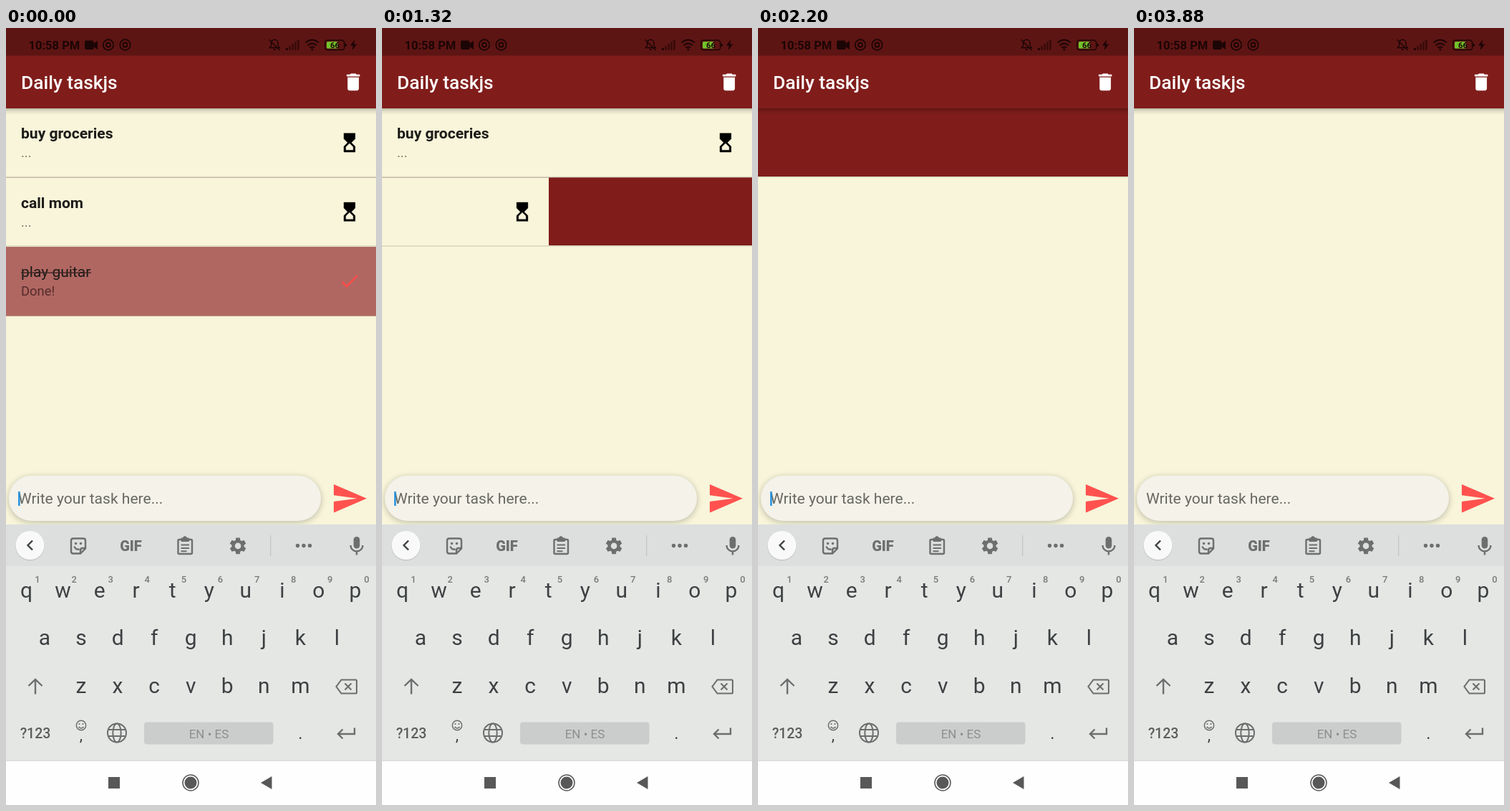
Write an HTML page that moves like this. It is 517 px wide and 1083 px high and loops after 3920 ms.

```html
<!DOCTYPE html>
<html lang="en">
<head>
<meta charset="utf-8">
<title>Daily tasks</title>
<style>
  html, body { margin: 0; width: 100%; height: 100%; overflow: hidden; background: #f8f5da; }
  svg { display: block; width: 517px; height: 1083px; font-family: Roboto, "Noto Sans", sans-serif; }
  .mid { text-anchor: middle; }
  .title { font-size: 21.05px; font-weight: 700; fill: #1c1b18; }
  .sub { font-size: 18.4px; fill: #77766a; }
  .line { fill: none; stroke: #6c6f6e; stroke-width: 2.4; }
  .key { font-size: 30px; fill: #3e4143; }
  .num { font-size: 13px; font-weight: 500; fill: #777a79; }

  /* rows are swiped away, then their red backing folds up */
  .row { transform-origin: 0 0; }
  .row, .tile, #caret { animation: 3920ms linear infinite both; }
  #r1 { animation-name: fold1; }
  #r2 { animation-name: fold2; }
  #r3 { animation-name: fold3; }
  #r1 .tile { animation-name: swipe1; }
  #r2 .tile { animation-name: swipe2; }
  #r3 .tile { animation-name: swipe3; }
  #caret { animation-name: blink; animation-timing-function: step-end; }

  @keyframes swipe3 {
    0%, 17.35% { transform: translateX(0); animation-timing-function: cubic-bezier(.45, 0, .5, 1); }
    24.48%, 25.48% { transform: translateX(512px); }
    25.51%, 100% { transform: translateX(520px); }
  }
  @keyframes fold3 {
    0%, 28.06% { transform: translateY(304.9px) scaleY(1); animation-timing-function: ease; }
    32.65%, 100% { transform: translateY(304.9px) scaleY(0); }
  }
  @keyframes swipe2 {
    0%, 30.36% { transform: translateX(0); animation-timing-function: cubic-bezier(.45, 0, .8, .7); }
    33.66%, 34.67% { transform: translateX(-284px); animation-timing-function: cubic-bezier(.2, .5, .6, 1); }
    37.76%, 100% { transform: translateX(-520px); }
  }
  @keyframes fold2 {
    0%, 41.84% { transform: translateY(208.4px) scaleY(1); animation-timing-function: cubic-bezier(.35, .2, .5, .92); }
    44.89%, 46.91% { transform: translateY(208.4px) scaleY(.094); }
    46.94%, 100% { transform: translateY(208.4px) scaleY(0); }
  }
  @keyframes swipe1 {
    0%, 43.88% { transform: translateX(0); }
    44.89%, 46.91% { transform: translateX(18px); animation-timing-function: cubic-bezier(.3, .2, .5, 1); }
    53.06%, 100% { transform: translateX(520px); }
  }
  @keyframes fold1 {
    0%, 56.5% { transform: translateY(112px) scaleY(1); animation-timing-function: ease; }
    61.22%, 100% { transform: translateY(112px) scaleY(0); }
  }
  @keyframes blink {
    0%, 25%, 50.51%, 76.02% { opacity: 1; }
    12.24%, 37.76%, 63.2%, 88.78%, 100% { opacity: 0; }
  }
</style>
</head>
<body>
<svg viewBox="0 0 517 1083">
  <defs>
    <linearGradient id="shade" x2="0" y2="1">
      <stop offset="0" stop-opacity=".26"/>
      <stop offset=".4" stop-opacity=".09"/>
      <stop offset="1" stop-opacity="0"/>
    </linearGradient>
    <filter id="blur" x="-10%" y="-50%" width="120%" height="200%"><feGaussianBlur stdDeviation="5"/></filter>
    <path id="glass" transform="translate(464.2 32) scale(1.316)" stroke="#000" stroke-width=".3" stroke-linejoin="round"
      d="M6 2l.01 6L10 12l-3.99 4.01L6 22h12v-6l-4-4 4-3.99V2H6zm10 14.5V20H8v-3.5l4-4 4 4z"/>
    <g id="ring" fill="none" stroke="#1c0505">
      <circle r="7.3" stroke-width="1.7"/>
      <circle r="3" stroke-width="1.8"/>
    </g>
  </defs>

  <rect width="517" height="1083" fill="#f8f5da"/>

  <g id="r3" class="row">
    <rect width="517" height="96.3" fill="#801d1b"/>
    <g class="tile">
      <rect width="517" height="96.3" fill="#b06762"/>
      <text x="21" y="42.3" class="title" style="font-weight:400">play guitar</text>
      <rect x="21" y="35.6" width="98" height="1.3" fill="#3a2220"/>
      <text x="21" y="68.3" class="sub" style="fill:#552b29">Done!</text>
      <path transform="translate(464.2 32) scale(1.316)" fill="#fb4d4b" d="M9 16.17L4.83 12l-1.42 1.41L9 19 21 7l-1.41-1.41z"/>
    </g>
  </g>
  <g id="r2" class="row">
    <rect width="517" height="95.2" fill="#801d1b"/>
    <g class="tile">
      <rect width="517" height="95.2" fill="#f8f5da"/>
      <text x="21" y="42.3" class="title">call mom</text>
      <text x="21" y="68.3" class="sub">...</text>
      <use href="#glass"/>
    </g>
    <rect y="95" width="517" height="1.4" fill="#d9d7c1"/>
  </g>
  <g id="r1" class="row">
    <rect width="517" height="95.2" fill="#801d1b"/>
    <g class="tile">
      <rect width="517" height="95.2" fill="#f8f5da"/>
      <text x="21" y="42.3" class="title">buy groceries</text>
      <text x="21" y="68.3" class="sub">...</text>
      <use href="#glass"/>
    </g>
    <rect y="95" width="517" height="1.4" fill="#d9d7c1"/>
  </g>

  <!-- app bar -->
  <rect y="112" width="517" height="9" fill="url(#shade)"/>
  <rect y="38" width="517" height="74" fill="#801d1b"/>
  <text x="21" y="84.5" font-size="26.3" font-weight="500" fill="#fff">Daily taskjs</text>
  <path transform="translate(469.4 59.5) scale(1.316)" fill="#fff" d="M6 19c0 1.1.9 2 2 2h8c1.1 0 2-.9 2-2V7H6v12zM19 4h-3.5l-1-1h-5l-1 1H5v2h14V4z"/>

  <!-- status bar -->
  <rect width="517" height="38.5" fill="#5d1514"/>
  <g fill="#1c0505">
    <text x="31.5" y="29.5" font-size="16.5" font-weight="600">10:58 PM</text>
    <rect x="110" y="17.5" width="12.5" height="12.5" rx="2"/>
    <path d="M122 22l6-4v12l-6-4z"/>
    <use href="#ring" x="143" y="23.5"/>
    <use href="#ring" x="166.5" y="23.5"/>
    <g fill="none" stroke="#1c0505" stroke-width="1.5">
      <path d="M368.5 27.5h13.500l-2-3v-3.500a4.700 4.700 0 0 0-9.400 0v3.500zM373.500 29.800h3.500M367.500 16l15 15"/>
    </g>
    <g fill="#3b0c0b">
      <rect x="395" y="25" width="2.8" height="6"/>
      <rect x="399" y="22" width="2.8" height="9"/>
      <rect x="403" y="19" width="2.8" height="12"/>
      <rect x="407" y="16" width="2.8" height="15"/>
    </g>
    <rect x="391" y="28" width="2.8" height="3"/>
    <g fill="none" stroke="#1c0505" stroke-width="2">
      <path d="M418.500 20.500q9.200-8 18.500 0M421.500 24.200q6.200-5.200 12.500 0M424.500 27.600q3.200-2.600 6.500 0"/>
    </g>
    <circle cx="427.800" cy="30" r="1.600"/>
    <rect x="445.800" y="17" width="27" height="13.500" rx="3.500" fill="none" stroke="#1c0505" stroke-width="1.500"/>
    <rect x="448" y="19" width="15.500" height="9.500" rx="1.500" fill="#73c22b"/>
    <rect x="474" y="21.500" width="1.800" height="4.500" rx=".8"/>
    <text x="459.500" y="28" class="mid" font-size="11.500" font-weight="700">66</text>
    <path d="M487.500 16l-6.500 8.500h4l-1.500 6.500 7-8.500h-4.300z"/>
  </g>

  <!-- input -->
  <rect x="4" y="626" width="436" height="63" rx="31.5" opacity=".24" filter="url(#blur)"/>
  <rect x="4" y="624" width="436" height="63" rx="31.5" fill="#f4f2e9"/>
  <text x="17" y="663" font-size="21.05" fill="#686862">Write your task here...</text>
  <rect id="caret" x="17" y="646" width="2.6" height="20" fill="#2b95e0"/>
  <path transform="translate(453.600 629.400) scale(2.190)" fill="#ff524f" d="M2.010 21L23 12 2.010 3 2 10l15 2-15 2z"/>

  <!-- keyboard -->
  <rect y="692" width="517" height="330" fill="#e5e7e5"/>
  <rect y="692" width="517" height="58" fill="#dcdfdd"/>
  <circle cx="33.500" cy="722" r="20.500" fill="#c7cac8"/>
  <circle cx="33.500" cy="721" r="20" fill="#f8f9f8"/>
  <path d="M37 714.500l-6.500 6.500 6.500 6.500" class="line" style="stroke:#3e4143"/>
  <g class="line">
    <path d="M94 711.500h14q3 0 3 3v11l-7 7H94q-3 0-3-3v-15q0-3 3-3zM111 725h-4q-3 0-3 3v4.500"/>
    <path d="M95.500 722.500q1.500 5 7 4"/>
    <path d="M242 713h16.500q1.500 0 1.500 1.500v17q0 1.500-1.500 1.500H242q-1.500 0-1.500-1.500v-17q0-1.500 1.500-1.500z"/>
    <path d="M244.500 720.500h11.500M244.500 725h11.500M244.500 729.300h8" stroke-width="2"/>
    <path d="M481.500 721a8.500 8.500 0 0 0 17 0M490 729.500v5"/>
    <path d="M31.500 917l9.500-9 9.500 9M41 909v19.500"/>
    <path d="M468.500 908.500h20q1.500 0 1.500 1.500v16q0 1.500-1.500 1.500h-20l-7-9.500zM473.500 913.500l9 9M482.500 913.500l-9 9" stroke-width="2.100"/>
    <path d="M487 975.500v8.500h-22.500M470.500 977.500l-6.500 6.500 6.500 6.500"/>
    <g style="stroke-width:2">
      <circle cx="155" cy="982.500" r="13"/>
      <ellipse cx="155" cy="982.500" rx="5.700" ry="13"/>
      <path d="M143 978h24M143 987h24"/>
    </g>
    <g style="stroke-width:1.500">
      <circle cx="105" cy="972" r="6.700"/>
      <path d="M101.500 974q3.500 4 7 0"/>
    </g>
  </g>
  <g fill="#6c6f6e">
    <circle cx="97.500" cy="718.500" r="1.700"/>
    <circle cx="104.500" cy="718.500" r="1.700"/>
    <rect x="244.500" y="710.500" width="11.500" height="5.500" rx="1"/>
    <circle cx="250" cy="711" r="2.700"/>
    <text x="174.500" y="728.500" class="mid" font-size="20" font-weight="900">GIF</text>
    <path transform="translate(309.800 707.600) scale(1.190)" d="M19.140 12.940c.04-.3.06-.61.06-.94 0-.32-.02-.64-.07-.94l2.030-1.580c.18-.14.23-.41.12-.61l-1.920-3.320c-.12-.22-.37-.29-.59-.22l-2.390.96c-.5-.38-1.030-.7-1.620-.94l-.36-2.540c-.04-.24-.24-.41-.48-.41h-3.840c-.24 0-.43.17-.47.41l-.36 2.540c-.59.24-1.130.57-1.620.94l-2.390-.96c-.22-.08-.47 0-.59.22L2.740 8.870c-.12.21-.08.47.12.61l2.030 1.580c-.05.3-.09.63-.09.94s.02.64.07.94l-2.030 1.580c-.18.14-.23.41-.12.61l1.920 3.320c.12.22.37.29.59.22l2.390-.96c.5.38 1.030.7 1.620.94l.36 2.540c.05.24.24.41.48.41h3.840c.24 0 .44-.17.47-.41l.36-2.540c.59-.24 1.130-.56 1.620-.94l2.390.96c.22.08.47 0 .59-.22l1.920-3.320c.12-.22.07-.47-.12-.61zM12 15.600a3.600 3.600 0 1 1 0-7.200 3.600 3.600 0 0 1 0 7.200z"/>
    <circle cx="407.500" cy="721.500" r="2.700"/>
    <circle cx="416" cy="721.500" r="2.700"/>
    <circle cx="424.500" cy="721.500" r="2.700"/>
    <rect x="485.700" y="709" width="8.600" height="16.500" rx="4.300"/>
    <circle cx="102.500" cy="970" r="1.100"/>
    <circle cx="107.500" cy="970" r="1.100"/>
  </g>
  <rect x="369" y="707" width="1.300" height="29" fill="#c5c8c6"/>
  <g id="keys"></g>
  <text x="41" y="990" class="mid" font-size="19.500" font-weight="500" fill="#5b5e5d">?123</text>
  <text x="105" y="993" class="mid" font-size="22" fill="#3e4143">,</text>
  <text x="411.500" y="991" class="mid" font-size="24" fill="#3e4143">.</text>
  <rect x="193" y="967.500" width="180.500" height="31" rx="4" fill="#cbcdcc"/>
  <text x="283.500" y="989.500" class="mid" font-size="17" fill="#8d8f8e">EN • ES</text>

  <!-- navigation -->
  <rect y="1021" width="517" height="62" fill="#fdfefd"/>
  <rect y="1020.500" width="517" height="1.200" fill="#d4d6d4"/>
  <g fill="#585858">
    <rect x="143" y="1044" width="16" height="16"/>
    <circle cx="258" cy="1052" r="8.500"/>
    <circle cx="258" cy="1052" r="11" fill="none" stroke="#585858" stroke-width="1.500"/>
    <path d="M356 1052l15.500-9v18z"/>
  </g>
</svg>
<script>
  const keys = document.getElementById('keys');

  function label(x, y, cls, str) {
    const el = document.createElementNS('http://www.w3.org/2000/svg', 'text');
    el.setAttribute('x', x);
    el.setAttribute('y', y);
    el.setAttribute('class', 'mid ' + cls);
    el.textContent = str;
    keys.append(el);
  }

  const rows = [['qwertyuiop', 28.5, 794], ['asdfghjkl', 54, 860], ['zxcvbnm', 105, 927]];
  for (const [letters, x, y] of rows) {
    [...letters].forEach((c, i) => label(x + i * 51.05, y, 'key', c));
  }
  [...'1234567890'].forEach((c, i) => label(44 + i * 51.1, 773, 'num', c));
</script>
</body>
</html>
```
